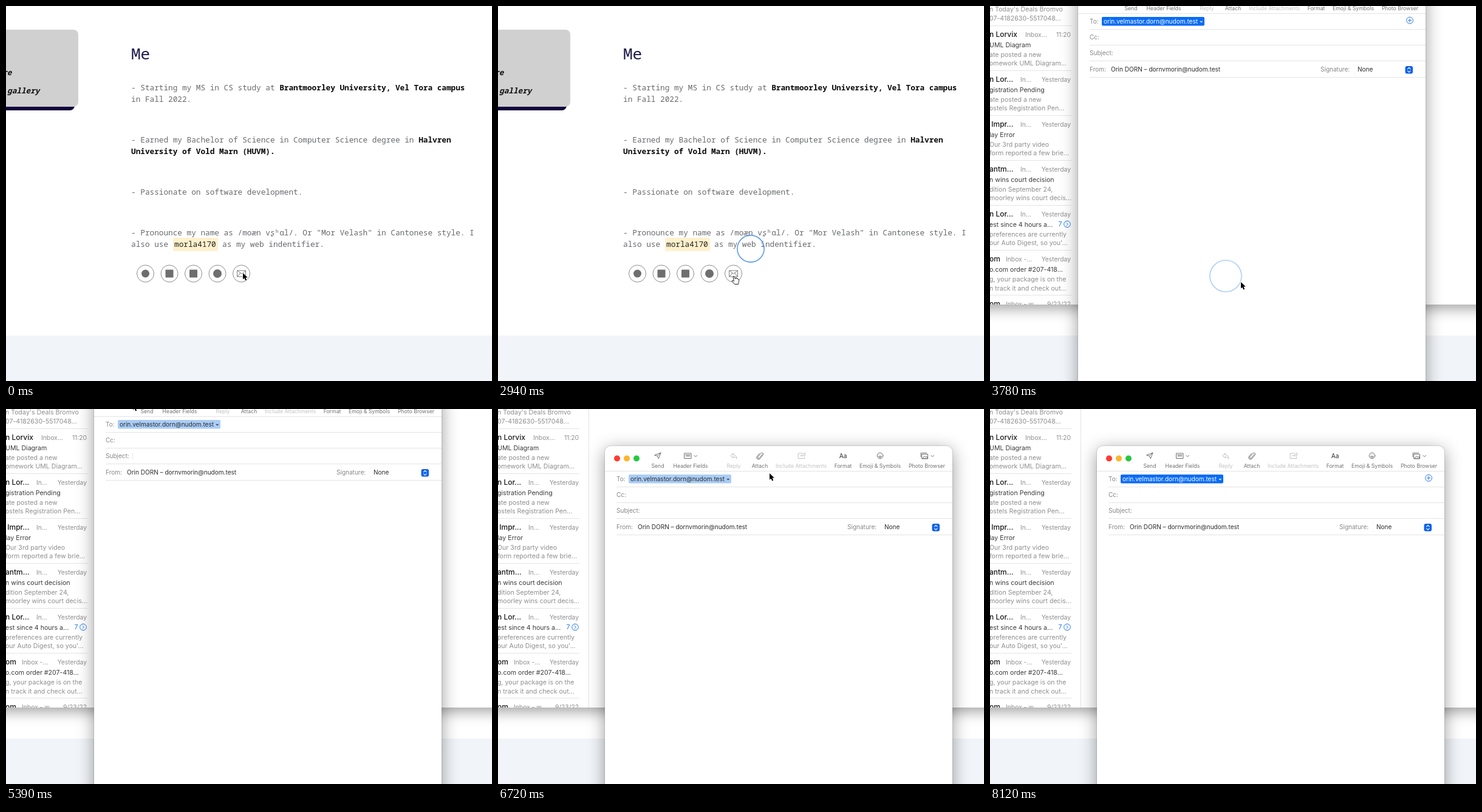
Recreate the animation shown at these times as an HTML page. Size 800 by 618 pixels, loop 8190 ms.

```html
<!DOCTYPE html>
<html lang="en">
<head>
<meta charset="utf-8">
<style>
  html, body { margin: 0; width: 100%; height: 100%; overflow: hidden; background: #fff; }
  svg { display: block; }
  text { white-space: pre; }
  .page text { font: 12.72px "Noto Sans Mono", monospace; fill: #686a6e; }
  .page .title { font-size: 26px; fill: #1c1b4a; }
  .page .nav { font-weight: 600; font-style: italic; fill: #111; }
  .page .dark { fill: #222; }
  .page tspan { font-weight: 600; fill: #0a0a0a; }
  .mail text { font: 10.6px Inter, sans-serif; fill: #8e8e90; }
  .mail .sender { font-size: 12px; font-weight: 500; fill: #1a1a1a; }
  .mail .subject { fill: #3a3a3a; }
  .mail .meta { font-size: 10.3px; }
  .mail .blue { fill: #1f78f0; }
  .compose text { font: 10.05px Inter, sans-serif; fill: #868688; }
  .compose .tool { font-size: 8.7px; fill: #707072; }
  .compose .off { fill: #c2c2c4; }
  .compose .value { fill: #2c2c2c; }
  .line { fill: none; stroke: #707072; stroke-linecap: round; stroke-linejoin: round; }
  .faint { stroke: #c2c2c4; }
  .rule { stroke: #e4e4e5; fill: none; }
</style>
</head>
<body>
<svg id="stage" width="800" height="618" viewBox="0 0 800 618"></svg>
<script>
const LOOP = 8190, STEP = 70;
const stage = document.getElementById('stage');

const text = (x, y, str, cls = '', anchor = 'start') =>
  `<text x="${x}" y="${y}" class="${cls}" text-anchor="${anchor}">${str}</text>`;
const rect = (x, y, w, h, fill, r = 0, extra = '') =>
  `<rect x="${x}" y="${y}" width="${w}" height="${h}" rx="${r}" fill="${fill}" ${extra}/>`;
const circle = (x, y, r, fill, extra = '') =>
  `<circle cx="${x}" cy="${y}" r="${r}" fill="${fill}" ${extra}/>`;
const path = (d, cls = 'line', extra = '') => `<path d="${d}" class="${cls}" ${extra}/>`;
const shadow = (y, blur, alpha) => `style="filter:drop-shadow(0 ${y}px ${blur}px rgba(0,0,0,${alpha}))"`;

function drawPage() {
  const rings = [229.5, 269, 308.5, 348, 387.5]
    .map(x => circle(x, 441, 14, '#fff', 'stroke="#8c8c8c"')).join('');
  return `<g class="page">
    ${rect(0, 543, 800, 75, '#f1f5f9')}
    ${rect(-20, 50, 133, 122, '#14003c', 8)}
    ${rect(-20, 39, 139, 127, '#d0d0d0', 8)}
    ${text(-6, 114, 're', 'nav')}
    ${text(2, 144, 'gallery', 'nav')}
    ${text(206, 88, 'Me', 'title')}
    ${text(206, 139, '- Starting my MS in CS study at <tspan>Brantmoorley University, Vel Tora campus</tspan>')}
    ${text(206, 158, 'in Fall 2022.')}
    ${text(206, 225, '- Earned my Bachelor of Science in Computer Science degree in <tspan>Halvren</tspan>')}
    ${text(206, 244, '<tspan>University of Vold Marn (HUVM).</tspan>')}
    ${text(206, 311, '- Passionate on software development.')}
    ${text(206, 378, '- Pronounce my name as /moæn vʂʰɑl/. Or "Mor Velash" in Cantonese style. I')}
    ${text(206, 397, 'also use')}
    ${rect(275, 382, 74, 22, '#fff1cc', 2)}
    ${text(277, 397, 'morla4170', 'dark')}
    ${text(356, 397, 'as my web indentifier.')}
    ${rings}
    ${circle(229.5, 441, 6.5, '#6e6e6e')}
    ${rect(262.5, 434.5, 13, 13, '#6e6e6e', 1)}
    ${rect(302, 434.5, 13, 13, '#6e6e6e', 1)}
    ${circle(348, 441, 7, '#6e6e6e')}
    ${path('M381 436h13.5v10H381zl6.8 5.5 6.7-5.5M381 446l4.8-6M394.5 446l-4.8-6', 'line', 'stroke-width=".9"')}
  </g>`;
}

// sender, mailbox, mailbox x, date, subject, two preview lines
const messages = [
  ['', '', 0, '', '', "n Today's Deals Bromvo", '07-4182630-5517048...'],
  ['n Lorvix', 'Inbox...', 58, '11:20', 'UML Diagram', 'ate posted a new', 'omework UML Diagram...'],
  ['n Lor...', 'In...', 50, 'Yesterday', 'gistration Pending', 'ate posted a new', 'ostels Registration Pen...'],
  [' Impr...', 'In...', 50, 'Yesterday', 'lay Error', 'Our 3rd party video', 'form reported a few brie...'],
  ['antm...', 'In...', 50, 'Yesterday', 'n wins court decision', 'dition September 24,', 'moorley wins court decis...'],
  ['n Lor...', 'In...', 50, 'Yesterday', 'est since 4 hours a...', 'preferences are currently', "our Auto Digest, so you'..."],
  ['om', 'Inbox -...', 26, 'Yesterday', 'o.com order #207-418...', 'g, your package is on the', 'n track it and check out...'],
  ['om', 'Inbox - w...', 26, '9/23/22', '', '', '']
];

function drawMail() {
  const rows = messages.map(([sender, box, boxX, date, subject, first, second], i) => {
    const y = -23.6 + i * 74.1;
    return text(-1, y, sender, 'sender') + text(boxX, y, box, 'meta') +
      text(133, y, date, 'meta', 'end') + text(-1, y + 17, subject, 'subject') +
      text(-1, y + 33, first) + text(-1, y + 47.5, second) +
      path(`M0 ${Math.round(y + 55.5) + .5}H134`, 'rule');
  }).join('');
  return `<g class="mail">
    ${rect(-40, -60, 880, 552, '#fff', 0, shadow(7, 11, .36))}
    <clipPath id="list"><rect width="800" height="492"/></clipPath>
    <g clip-path="url(#list)">${rows}${path('M149.5 0V492', 'rule')}</g>
    ${text(112.5, 363, '7', 'blue')}
    ${circle(127, 359.5, 5.3, 'none', 'stroke="#1f78f0"')}
    ${path('M126 357l2.3 2.5-2.3 2.5', 'line', 'style="stroke:#1f78f0"')}
  </g>`;
}

function drawCompose() {
  const tools = [[263, 'Send'], [317, 'Header Fields'], [388, 'Reply', 1], [431, 'Attach'],
    [499, 'Include Attachments', 1], [568, 'Format'], [629, 'Emoji &amp; Symbols'], [706, 'Photo Browser']]
    .map(([x, label, off]) => text(x, 97, label, off ? 'tool off' : 'tool', 'middle')).join('');
  const fields = [[118.5, 'To:'], [144.5, 'Cc:'], [170.5, 'Subject:'], [198, 'From:']]
    .map(([y, label]) => text(195, y, label) + path(`M195 ${Math.floor(y + 9.5) + .5}H748`, 'rule')).join('');
  const lights = ['#fe3b30', '#fdb52b', '#25c93f'].map((fill, i) => circle(196 + 16 * i, 81.5, 5, fill)).join('');
  return `<g class="compose" id="compose">
    ${rect(176, 61, 572, 760, '#fff', 10, shadow(6, 14, .4))}
    ${rect(175.5, 60.5, 573, 761, 'none', 10, 'stroke="#000" stroke-opacity=".1"')}
    ${path('M176 102.5H748', 'rule')}
    ${lights}
    ${path('M258 76l10-4-3.6 10-2-4.4zM262.4 77.6L268 72M307 73h11v8.5h-11zM309 75.5h7M309 77.5h7M323 76.5l2.3 2.3 2.3-2.3')}
    ${path('M387 73l-4.5 4 4.5 4v-2.5q4 0 6 3.5 0-6.5-6-6.5zM502 73h-8v8.5h10.5V79M497 77h3M505 72.5l-5 4.5h5z', 'line faint')}
    ${path('M435 75l-4.8 5.8a1.5 1.5 0 0 1-2.4-1.9l5-5.9a2.2 2.2 0 0 1 3.4 2.8l-5.2 6.2a3 3 0 0 1-4.6-3.9l4-4.7')}
    <g style="font-size:10.5px">${text(568, 81, 'Aa', 'value', 'middle')}</g>
    ${circle(629, 77, 4.8, 'none', 'class="line"')}
    ${path('M626.5 78.5q2.5 3.5 5 0zM627.3 75.5v.3M630.7 75.5v.3')}
    ${path('M696 79V72.5h9.5M698 74.5h9.5V82H698zM699 81l3-3.5 2 2 1.5-1.5 2 3zM713 76.5l2.3 2.3 2.3-2.3')}
    ${tools}${fields}
    <rect id="chip" x="215" y="108" width="169" height="14.5" rx="2"/>
    <text id="address" x="218" y="118.5">orin.velmastor.dorn@nudom.test</text>
    <path id="chevron" d="M377 114.8l1.8 1.8 1.8-1.8" fill="none" stroke-width="1.2"/>
    <g id="plus">${circle(722, 113.7, 5.4, 'none', 'stroke="#2b78ea"')}
      <path d="M719 113.7h6M722 110.7v6" stroke="#2b78ea"/></g>
    <path id="caret" d="M239.5 162v11" stroke="#e6e6e8"/>
    ${text(230, 198, 'Orin DORN – dornvmorin@nudom.test', 'value')}
    ${text(575, 198, 'Signature:')}
    ${rect(630, 187, 98.5, 16, '#fff', 4, shadow(.5, .7, .25))}
    ${text(636, 198, 'None', 'value')}
    ${rect(714.5, 189, 12.5, 12.5, '#0a60ee', 3)}
    ${path('M718.5 193.8l2.3-2.3 2.3 2.3M718.5 196.8l2.3 2.3 2.3-2.3', 'line', 'style="stroke:#fff;stroke-width:1.2"')}
  </g>`;
}

stage.innerHTML = drawPage() +
  `<g id="windows">${drawMail()}${drawCompose()}</g>
  <circle id="ring" fill="none" stroke="#5598ee" stroke-width="1.6"/>
  <path id="arrow" d="M0 0V10.6L2.4 8.4 4.2 12.4 6.2 11.5 4.5 7.6H7.8Z" fill="#000" stroke="#fff" stroke-width="1.2" paint-order="stroke"/>
  <path id="hand" d="M-1 1.2Q.2-.3 1.2 1.2L2.5 5Q4 0 5 4.5 6.5 3.3 7 5.2 8.8 4.5 8.7 7.5 8.6 10 7.5 11.5V13.5H1.5L-2.8 8.5Q-3.3 6.7-1.3 7.5L.3 8.5Z" fill="#fff" stroke="#222" stroke-linejoin="round"/>`;

const [windows, compose, chip, address, chevron, plus, caret, ring, arrow, hand] =
  ['windows', 'compose', 'chip', 'address', 'chevron', 'plus', 'caret', 'ring', 'arrow', 'hand']
    .map(id => document.getElementById(id));

// time, x, y
const pointer = [
  [0, 390, 440], [1820, 388, 443], [1960, 388, 443], [2660, 416, 400], [2800, 416, 400],
  [2940, 388, 445], [3570, 388, 445], [3780, 413, 455], [4480, 413, 455], [5250, 209, -9],
  [5460, 209, -9], [6230, 240, 81], [6300, 240, 81], [6720, 447, 106], [7000, 447, 106],
  [7560, 470, -20], [LOOP, 470, -20]
];
const clicks = [[2730, 416, 400], [3465, 388, 445]];

const ease = (t, from, to) => {
  const p = Math.min(1, Math.max(0, (t - from) / (to - from)));
  return p * p * (3 - 2 * p);
};
const show = (el, on) => el.setAttribute('visibility', on ? 'inherit' : 'hidden');
const place = (el, x, y) => el.setAttribute('transform', `translate(${x} ${y})`);

function pointerAt(t) {
  const i = pointer.findIndex(k => k[0] > t);
  const [t0, x0, y0] = pointer[i - 1], [t1, x1, y1] = pointer[i];
  const p = ease(t, t0, t1);
  return [x0 + (x1 - x0) * p, y0 + (y1 - y0) * p];
}

function render(t) {
  show(windows, t >= 3640);
  const left = 1 - ease(t, 5460, 6230);
  place(compose, -31 * left, -90 * left);

  const blurred = t >= 4830 && t < 7840;
  chip.setAttribute('fill', blurred ? '#aacdf7' : '#0a6cf5');
  address.style.fill = blurred ? '#2c2c2c' : '#fff';
  chevron.setAttribute('stroke', blurred ? '#333' : '#fff');
  show(plus, !blurred);
  show(caret, blurred && t % 1000 < 500);

  const click = clicks.find(([start]) => t >= start && t < start + 350);
  show(ring, click);
  if (click) {
    const p = (t - click[0]) / 350;
    place(ring, click[1], click[2]);
    ring.setAttribute('r', 26.3 * (1 - (1 - p) ** 2));
    ring.setAttribute('opacity', 1 - p ** 6);
  }

  const [x, y] = pointerAt(t), overLink = t >= 2870 && t < 3640;
  show(hand, overLink);
  show(arrow, !overLink);
  place(hand, x, y);
  place(arrow, x, y);
}

const begin = performance.now();
function tick() {
  const t = (performance.now() - begin) % LOOP;
  render(Math.floor(t / STEP) * STEP);
  requestAnimationFrame(tick);
}
tick();
</script>
</body>
</html>
```
